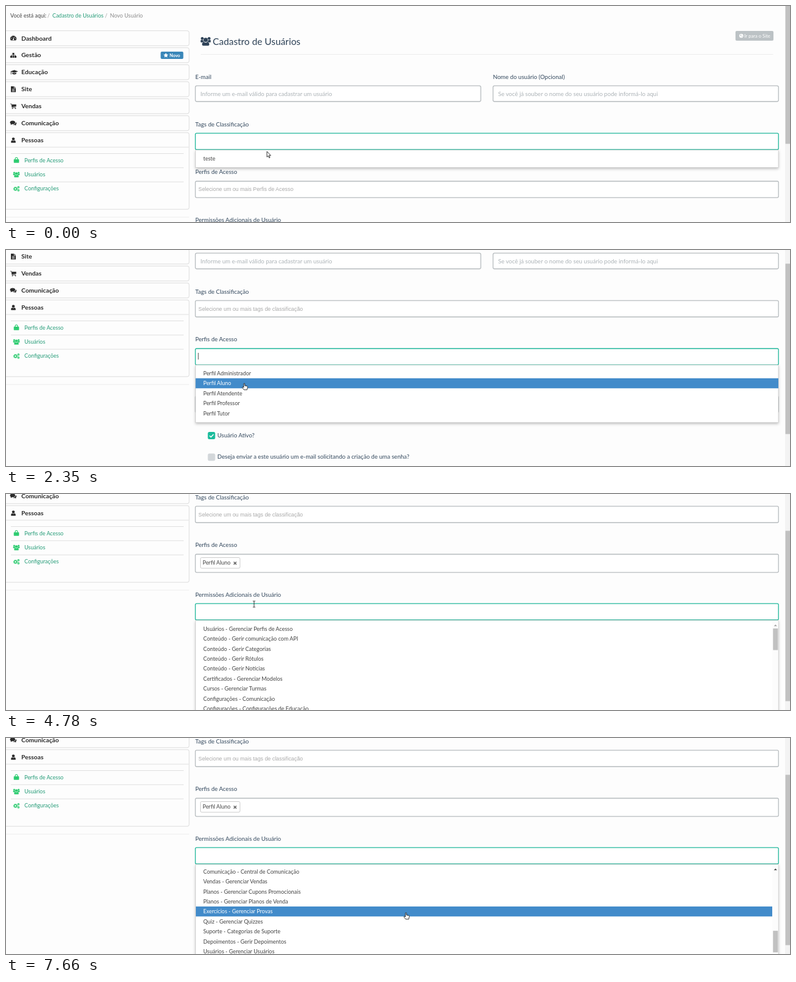
Write an HTML page that moves like this. It is 1280 by 355 pixels and loops after 8 s.

```html
<!DOCTYPE html>
<html lang="pt-BR">
<head>
<meta charset="utf-8">
<title>Cadastro de Usuários</title>
<style>
html, body { margin: 0; width: 100%; height: 100%; overflow: hidden; background: #fdfdfd; }
svg { display: block; }
text { font-family: Lato, sans-serif; font-size: 8.96px; fill: #444; white-space: pre; }
.label { font-size: 9.6px; fill: #34495e; }
.hint { font-size: 9.6px; fill: #acb3b7; }
.pick { font-family: "Liberation Sans", Arial, sans-serif; font-size: 8.83px; fill: #aaa; }
.menu { font-size: 10.24px; font-weight: 700; fill: #2b2b2b; }
.title { font-size: 15.36px; fill: #2f4358; }
.link { fill: #259c78; }
.field { fill: #fff; stroke: #b7bcbf; stroke-width: 1.3; }
.field.on { stroke: #1fb79b; }
.panel { fill: #fdfdfd; stroke: #dcdcdc; }
.drop { filter: drop-shadow(0 2px 2px rgba(0, 0, 0, .25)); }
.line { stroke: #dfdfdf; }
.faint { stroke: #ececec; }
.caret { stroke: #333; stroke-width: .9; }
.bar { fill: #428bca; }
.hot { fill: #fff; }
</style>
</head>
<body>
<svg id="stage" width="1280" height="355" viewBox="0 0 1280 355">
<defs>
  <g id="users">
    <circle cx="-3.6" cy="-3" r="1.5"/><circle cx="3.6" cy="-3" r="1.5"/>
    <path d="M-5.3 .8C-5.600-1-5-1.700-4.500-1.600Q-3.500-.9-2.500-1.300Q-2.300 0-1.700 .5Q-3 .4-3.500 1.200H-4.800ZM5.300 .8C5.600-1 5-1.700 4.500-1.600Q3.500-.9 2.500-1.300Q2.300 0 1.700 .5Q3 .4 3.500 1.200H4.800Z"/>
    <circle cy="-1.500" r="2.200"/>
    <path d="M-2.800 4.700Q-3.900 4.600-3.800 3.300Q-3.700 .9-2 .7Q0 2.100 2 .7Q3.700 .9 3.800 3.300Q3.900 4.600 2.800 4.700Z"/>
  </g>
  <g id="gauge">
    <path d="M-4.200 3.600A5 5 0 1 1 4.200 3.600Z"/>
    <path d="M0 2L1-2" stroke="#fff" stroke-width=".8"/>
    <g fill="#fff"><circle cy="1.900" r="1.100"/><circle cx="-3.300" cy=".6" r=".6"/><circle cx="3.300" cy=".6" r=".6"/><circle cx="-2.200" cy="-2" r=".6"/><circle cx="2.500" cy="-2" r=".6"/></g>
  </g>
  <g id="tree">
    <path d="M-1.500-4h3v2.800h-3zM-5 1.200h3V4h-3zM-1.500 1.200h3V4h-3zM2 1.200h3V4h-3z"/>
    <path d="M0-2V2M-3.500 2V0H3.500V2" fill="none" stroke="#2b2b2b" stroke-width=".8"/>
  </g>
  <g id="cap">
    <path d="M-6.300-1.300L0-3.500L6.300-1.300L0 .9ZM-3.300 .6L0 1.800L3.300 .6V2.600Q0 4.600-3.300 2.600Z"/>
    <path d="M-5.200-1V3.600" stroke="#2b2b2b" stroke-width=".9"/>
  </g>
  <g id="file">
    <path d="M-4-4.800H.8V-1.500H4V4.800H-4ZM1.500-4.800L4-2.200H1.500Z"/>
    <path d="M-2.200 0H2.200M-2.200 1.600H2.200M-2.200 3.200H2.200" stroke="#fff" stroke-width=".7"/>
  </g>
  <g id="cart">
    <path d="M-2.800-2.800H4.700V.6L-2 1.500Z"/>
    <path d="M-4.800-3.700H-3.200L-1.900 2.400H4" fill="none" stroke="#2b2b2b" stroke-width=".9"/>
    <circle cx="-1.500" cy="3.700" r=".9"/><circle cx="3.500" cy="3.700" r=".9"/>
  </g>
  <g id="chat">
    <path d="M4.500 3.900Q3.300 3.700 2.700 3Q.6 3.300-.8 2.500Q4 1.800 4-1.700Q5.500-.6 5.200 .8Q4.900 2 4 2.500Z"/>
    <ellipse cx="-1.200" cy="-1.200" rx="4.200" ry="2.900"/><path d="M-4 .5L-4.400 2.700Q-3 2.500-1.800 1.400Z"/>
  </g>
  <g id="user">
    <circle cy="-1.900" r="2.300"/>
    <path d="M-3 4.300Q-4 4.200-3.900 3Q-3.700 .5-2 .3Q0 1.700 2 .3Q3.700 .5 3.900 3Q4 4.200 3 4.300Z"/>
  </g>
  <g id="bag">
    <rect x="-4.300" y="-1.500" width="8.600" height="5.700" rx=".7"/>
    <path d="M-2-1V-2.500A2 2 0 0 1 2-2.500V-1" fill="none" stroke="#2ecc71" stroke-width="1.200"/>
  </g>
  <g id="cogs" fill="none" stroke="#2ecc71">
    <circle cx="-1.600" cy=".3" r="2" stroke-width="1.500"/>
    <circle cx="-1.600" cy=".3" r="3.100" stroke-width="1" stroke-dasharray="1.220"/>
    <circle cx="3.300" cy="-2.300" r="1.200" stroke-width="1.200"/><circle cx="3.300" cy="2.700" r="1.200" stroke-width="1.200"/>
  </g>
  <path id="star" d="M0-4L1.200-1.400L4-1.100L1.900 .8L2.500 3.600L0 2.200L-2.500 3.600L-1.900 .8L-4-1.100L-1.200-1.400Z"/>
  <g id="globe"><circle r="3.300"/><path d="M-1.500-2L.3-1.600L-.6 0L-1.800-.3ZM.8 0L2.300 .4L1 2.200Z" fill="#bcc2c5"/></g>
</defs>
<g id="page"></g>
<rect x="1272" width="8" height="355" fill="#f3f3f3"/>
<rect id="thumb" x="1272.500" width="7.500" height="280" fill="#c1c1c1"/>
<g id="cursor" fill="#fff" stroke="#222" stroke-width=".9" stroke-linejoin="round">
  <path id="arrow" d="M0 0V9.200L2.100 7.300L3.600 10.600L5 10L3.600 6.700H6.300Z"/>
  <path id="hand" d="M-.9 .6Q0-.6 .9 .6V4L4.500 4.700Q5.600 5 5.400 6.400L4.600 10.800H-.4L-3.300 7.100Q-3.300 5.700-2 6.100L-.9 7Z"/>
  <path id="beam" fill="none" d="M-2-5H-.7L0-4.500L.7-5H2M0-4.500V4.500M-2 5H-.7L0 4.500L.7 5H2"/>
</g>
</svg>
<script>
const $ = id => document.getElementById(id);
const ROW = 16.4, LOOP = 8000;

const text = (x, y, s, cls = '') => `<text x="${x}" y="${y}" class="${cls}">${s}</text>`;
const rect = (x, y, w, h, cls, rx = 2.5, id = '') =>
  `<rect id="${id}" x="${x}" y="${y}" width="${w}" height="${h}" rx="${rx}" class="${cls}"/>`;
const line = (x1, x2, y, cls = 'line') => `<path d="M${x1} ${y}H${x2}" class="${cls}"/>`;
const icon = (name, x, y, fill, scale = 1) =>
  `<use href="#${name}" transform="translate(${x} ${y}) scale(${scale})" fill="${fill}"/>`;
const caret = (id, x, y) => `<path id="${id}" class="caret" d="M${x} ${y}v11"/>`;
const dropBox = (y, h) => `<rect class="drop" x="309.500" y="${y}" width="951.500" height="${h}" fill="#fff" stroke="#c4c4c4" stroke-width=".6"/>`;

const menu = [['gauge', 'Dashboard'], ['tree', 'Gestão'], ['cap', 'Educação'], ['file', 'Site'],
  ['cart', 'Vendas'], ['chat', 'Comunicação'], ['user', 'Pessoas']];
const links = [['bag', 'Perfis de Acesso'], ['users', 'Usuários'], ['cogs', 'Configurações']];
const profiles = ['Administrador', 'Aluno', 'Atendente', 'Professor', 'Tutor'].map(s => 'Perfil ' + s);
const rights = `Usuários:Gerenciar Perfis de Acesso
Conteúdo:Gerir comunicação com API|Gerir Categorias|Gerir Rótulos|Gerir Notícias
Certificados:Gerenciar Modelos
Cursos:Gerenciar Turmas
Configurações:Comunicação|Configurações de Educação|Configurações de Site|Vendas
Cursos:Gerenciar Categorias|Gerenciar Cursos|Gerenciar Aulas
Educação:Gerenciar Fóruns
Matrículas:Gerenciar Acessos|Importar Matrículas|Gerenciar Matrículas|Visualizar minhas Matrículas|Redefinir visualizações de curso
Cursos:Gerenciar Rótulos
Educação:Central de Questões
Frontend:Gerenciar Menus|Gerenciar Páginas
Comunicação:Mensagens de Dashboard|Central de Comunicação
Vendas:Gerenciar Vendas
Planos:Gerenciar Cupons Promocionais|Gerenciar Planos de Venda
Exercícios:Gerenciar Provas
Quiz:Gerenciar Quizzes
Suporte:Categorias de Suporte
Depoimentos:Gerir Depoimentos
Usuários:Gerenciar Usuários`.split('\n').flatMap(l => {
  const [group, items] = l.split(':');
  return items.split('|').map(s => group + ' - ' + s);
});

function sidebar() {
  let s = '';
  menu.forEach(([name, label], i) => {
    const y = 40.700 + 27.900 * i, last = i === 6;
    s += rect(-5, y, 304, last ? 126 : 24.600, 'panel', 3);
    s += icon(name, name === 'cap' ? 13.500 : 12, y + 12.300, '#2b2b2b') + text(25, y + 15.800, label, 'menu');
  });
  s += rect(252.500, 75, 37, 12, '', 2).replace('/>', ' fill="#3a87b9"/>') + icon('star', 261, 81, '#fff');
  s += `<text x="267" y="83.600" style="font-size:7.2px;font-weight:700;fill:#fff">Novo</text>`;
  s += line(0, 298.500, 232);
  links.forEach(([name, label], i) => {
    const y = 253.600 + 23.300 * i;
    s += line(8, 290, y - 11.100) + icon(name, 17, y, '#2ecc71') + text(30, y + 3.200, label, 'link');
  });
  return s + line(0, 299, 347, 'faint');
}

function form() {
  return text(7, 18.600, 'Você está aqui:') + text(67.500, 18.600, '/').replace('class=""', 'fill-opacity=".5"')
    + text(75.700, 18.600, 'Cadastro de Usuários', 'link') + text(161.500, 18.600, '/').replace('class=""', 'fill-opacity=".5"')
    + text(169.700, 18.600, 'Novo Usuário').replace('class=""', 'style="fill:#8b8b8b"')
    + icon('users', 326, 58, '#2f4358', 1.550) + text(337.500, 63.700, 'Cadastro de Usuários', 'title')
    + line(318, 1252.500, 79.500, 'faint')
    + rect(1191, 41, 62, 16, '', 2).replace('/>', ' fill="#bcc2c5"/>') + icon('globe', 1200.500, 49, '#fff')
    + `<text x="1205.500" y="51.800" style="font-size:7.68px;fill:#fff">Ir para o Site</text>`
    + text(309, 119.600, 'E-mail', 'label') + text(795, 119.600, 'Nome do usuário (Opcional)', 'label')
    + rect(309.200, 131.200, 466, 25.800, 'field') + rect(795.200, 131.200, 466, 25.800, 'field')
    + text(317.500, 147.500, 'Informe um e-mail válido para cadastrar um usuário', 'hint')
    + text(803.500, 147.500, 'Se você já souber o nome do seu usuário pode informá-lo aqui', 'hint')
    + text(309, 197.500, 'Tags de Classificação', 'label') + rect(309.200, 209.200, 952, 26.800, 'field', 2, 'tags')
    + text(314, 225.500, 'Selecione um ou mais tags de classificação', 'pick tagHint')
    + text(309, 276, 'Perfis de Acesso', 'label') + rect(309.200, 288, 952, 26.800, 'field', 2, 'roles')
    + text(314, 303.700, 'Selecione um ou mais Perfis de Acesso', 'pick roleHint')
    + `<g id="chip">${rect(317.500, 293.500, 64.500, 17.500, '', 2).replace('/>', ' fill="#fff" stroke="#ccc"/>')}${text(321, 305.200, 'Perfil Aluno')}
       <path d="M371.800 300.500l4.400 4.400m0-4.400l-4.400 4.400" stroke="#666" stroke-width="1.500"/></g>`
    + caret('caretA', 314, 295) + caret('caretB', 382, 295);
}

function lower() {
  return text(309, 355, 'Permissões Adicionais de Usuário', 'label') + rect(309.200, 366.200, 952, 26.800, 'field', 2, 'perms')
    + text(314, 382.600, 'Selecione uma ou mais permissões de acesso', 'pick permHint') + caret('caretC', 314, 374)
    + `<rect x="329.500" y="425" width="12" height="12" rx="2.500" fill="#1abc9c"/>
       <path d="M332.300 431.200l2.300 2.300l4.200-4.500" fill="none" stroke="#fff" stroke-width="1.500"/>
       <rect x="329.500" y="460.500" width="12" height="12" rx="2.500" fill="#d3d7da"/>`
    + text(345, 433.500, 'Usuário Ativo?', 'label')
    + text(345, 469, 'Deseja enviar a este usuário um e-mail solicitando a criação de uma senha?', 'label')
    + `<g id="permDrop">${dropBox(393.800, 154)}
       <svg x="310" y="395" width="951" height="152"><g id="list">${rect(0, 0, 941, ROW, 'bar', 0, 'permBar')}${
         rights.map((s, i) => text(12, 15.700 + ROW * i, s, 'right')).join('')}</g></svg>
       <rect x="1251.500" y="395" width="9" height="152" fill="#fcfcfc"/>
       <path id="up" d="M1253.700 403.200l2.600-2.800l2.600 2.800z"/>
       <rect id="listThumb" x="1252.300" width="8" height="35.500" fill="#c1c1c1"/></g>`;
}

$('page').innerHTML = sidebar() + form() + `<g id="low">${lower()}</g>`
  + `<g id="tagDrop">${dropBox(236.800, 28.500)}${text(322, 253.600, 'teste')}</g>`
  + `<g id="roleDrop">${dropBox(315, 94.500)}${rect(309.500, 0, 951.500, 16.500, 'bar', 0, 'roleBar')}${
      profiles.map((s, i) => text(322, 331.700 + 16.500 * i, s, 'role')).join('')}</g>`;

// Moments at which the screen refreshes
const ticks = [0, 280, 430, 550, 680, 810, 950, 1100, 1250, 1400, 1530, 2080, 2230, 2350, 2470, 2610, 2750,
  3200, 3330, 3470, 3620, 3780, 4050, 4200, 4350, 4500, 4640, 4780, 4910, 5060, 5210, 5340, 5640,
  6200, 6330, 6460, 6590, 6750, 7220, 7520, 7660];
const pageScroll = [[930, 0], [950, 1], [1100, 72], [1240, 126], [3240, 126], [3620, 189]];
const listScroll = [[5500, 0], [5620, 63], [6100, 63], [6590, 282.800], [6740, 315], [7440, 315], [7640, 412]];
const pointer = [[220, 426, 239], [810, 488, 192], [950, 488, 192], [1250, 451, 186], [1400, 430, 182], [1530, 420, 180],
  [2080, 420, 182], [2230, 402, 204], [2350, 389, 219], [2610, 389, 219], [3200, 394, 217], [3780, 396, 206],
  [4050, 397, 200], [4500, 404, 190], [4780, 405, 181], [4910, 500, 228], [5060, 610, 268], [5210, 645, 286], [5340, 653, 287]];
const shapes = [[0, 'arrow'], [1250, 'beam'], [2230, 'hand'], [3200, 'arrow'], [4350, 'beam'], [4910, 'hand']];

function at(track, t, k = 1) {
  const n = track.findIndex(p => p[0] > t);
  if (n === 0) return track[0][k];
  if (n < 0) return track[track.length - 1][k];
  const a = track[n - 1], b = track[n];
  return a[k] + (b[k] - a[k]) * (t - a[0]) / (b[0] - a[0]);
}
const within = (t, a, b) => t >= a && t < b;
const show = (el, on) => { el.style.display = on ? '' : 'none'; };
const move = (id, x, y) => $(id).setAttribute('transform', `translate(${x} ${y})`);
const one = cls => document.querySelector('.' + cls);
const roleRows = document.querySelectorAll('.role'), rightRows = document.querySelectorAll('.right');

function highlight(bar, rows, index, y) {
  show(bar, index >= 0);
  bar.setAttribute('y', y);
  rows.forEach((r, i) => r.classList.toggle('hot', i === index));
}

function draw(t) {
  const scroll = at(pageScroll, t), list = at(listScroll, t);
  const x = at(pointer, t, 1), y = at(pointer, t, 2);
  const shape = shapes.filter(s => s[0] <= t).pop()[1];
  const tagOpen = t < 680, roleOpen = within(t, 2080, 3200), chosen = t >= 3200, permOpen = t >= 4500;

  move('page', 0, -scroll);
  move('low', 0, chosen ? 3 : 0);
  $('thumb').setAttribute('y', -53.500 + .603 * scroll);
  move('cursor', x, y);
  for (const s of ['arrow', 'hand', 'beam']) show($(s), s === shape);

  $('tags').classList.toggle('on', tagOpen);
  $('roles').classList.toggle('on', within(t, 2080, 4500));
  $('perms').classList.toggle('on', permOpen);
  $('roles').setAttribute('height', chosen ? 29.800 : 26.800);
  show($('tagDrop'), tagOpen);
  show(one('tagHint'), !tagOpen);
  show($('roleDrop'), roleOpen);
  show(one('roleHint'), t < 2080);
  show($('chip'), chosen);
  show($('permDrop'), permOpen);
  show(one('permHint'), !permOpen);
  show($('caretA'), within(t, 2080, 2610));
  show($('caretB'), within(t, 3200, 3780));
  show($('caretC'), within(t, 5060, 5640) || within(t, 6200, 6750) || within(t, 7220, 7660));

  const hand = shape === 'hand';
  const role = hand && roleOpen ? Math.round((y + scroll - 328.500) / 16.500) : -1;
  highlight($('roleBar'), roleRows, role, 320.300 + 16.500 * role);
  const still = list === at(listScroll, t - 5);
  const right = hand && permOpen && still ? Math.round((y - 221.500 + list) / ROW) : -1;
  highlight($('permBar'), rightRows, right, 4.300 + ROW * right);
  move('list', 0, -list);
  $('listThumb').setAttribute('y', 407 + list / 4.300);
  $('up').setAttribute('fill', list ? '#404040' : '#a3a3a3');
}

let shown = -1;
function frame(now) {
  const t = now % LOOP, tick = ticks.filter(v => v <= t).pop();
  if (tick !== shown) draw(shown = tick);
  requestAnimationFrame(frame);
}
draw(0);
requestAnimationFrame(frame);
</script>
</body>
</html>
```
